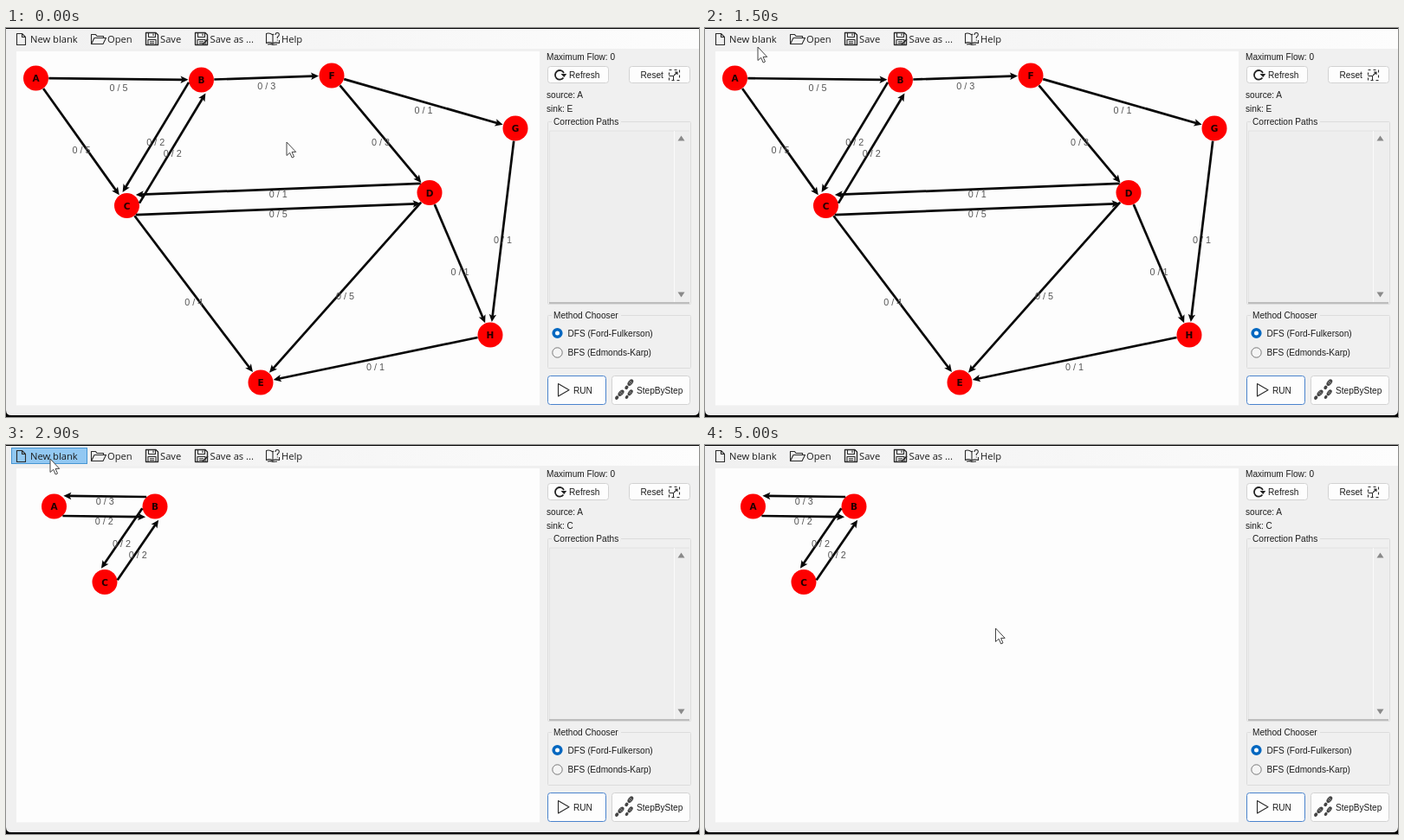
These frames come from a looping animation (800x450 px, 5150 ms). An HTML page:

```html
<!DOCTYPE html>
<html lang="en">
<head>
<meta charset="utf-8">
<title>Maximum flow editor</title>
<style>
  html, body { margin: 0; width: 100%; height: 100%; overflow: hidden; background: #000; }
  svg { display: block; width: 100vw; height: 100vh; }
  text { font: 10.1px "Liberation Sans", Arial, sans-serif; fill: #1c1c1c; }
  .menu text { font: 11.2px "Open Sans", "Noto Sans", sans-serif; }
  .node { font: bold 10.5px "DejaVu Sans", sans-serif; fill: #240000; text-anchor: middle; }
  .flow { font-size: 10.8px; fill: #555; text-anchor: middle; }
  .icon { fill: none; stroke: #2b2b2b; stroke-width: 1.1; stroke-linejoin: round; }
  .button { fill: #fdfdfd; stroke: #d2d2d2; }
  .group { fill: none; stroke: #dcdcdc; }
</style>
</head>
<body>
<svg viewBox="0 0 800 450">
  <defs>
    <linearGradient id="bar"><stop stop-color="#f0f0f0"/><stop offset="1" stop-color="#fdfdfd"/></linearGradient>
    <g id="floppy">
      <path d="M.5.5H12L14.5 3V14.5H.5Z" stroke-width="1.4"/>
      <path d="M3.5.5V5.5H11.5V.5M9 1.5V4M3 14.5V8.5H12V14.5M5 10.7H10M5 12.7H10"/>
    </g>
    <g id="foot" fill="#444">
      <ellipse cy="-3" rx="2.6" ry="4.3"/>
      <ellipse cy="4.2" rx="1.9" ry="2.4"/>
      <path d="M-2-4H2M-2-2H2" stroke="#aaa" stroke-width=".7"/>
    </g>
  </defs>

  <path d="M0 1H800V442Q800 448 794 448H6Q0 448 0 442Z" fill="#f0f0f0"/>
  <rect y="1" width="800" height="23" fill="url(#bar)"/>
  <rect x="12" y="27" width="604" height="409.5" fill="#fdfdfd"/>

  <rect id="hover" x="6.5" y="3.5" width="87" height="18" fill="#92c8f2" stroke="#4595d2"/>
  <g class="menu">
    <g class="icon">
      <path d="M12.5 6.5H18.5L22.5 10.5V19.5H12.5ZM18.5 6.5V10.5H22.5"/>
      <path d="M98.5 18.5V7.5H103.5L105 9.5H112.5V11.5M98.5 18.5L102 11.5H115.5L112 18.5Z"/>
      <use href="#floppy" x="161" y="5"/>
      <use href="#floppy" x="218" y="5"/>
      <path d="M227 19L233 13" stroke-width="1.6"/>
      <path d="M308 18Q304 15.5 300.5 17.5V6.5Q304 5 308 8V18Q311 16 315.5 17.5V14M308 8L309 7M302 19Q306 18 308 19.5L313 19"/>
      <path d="M311 8Q311 5.5 313.2 5.5T315.3 8Q315.2 9.2 313.3 10.5V12M313.3 13.5V14.5"/>
    </g>
    <text x="28" y="17">New blank</text>
    <text x="117" y="17">Open</text>
    <text x="178" y="17">Save</text>
    <text x="235.5" y="17">Save as ...</text>
    <text x="318" y="17">Help</text>
  </g>

  <text x="624" y="37">Maximum Flow: 0</text>
  <rect class="button" x="625.5" y="44.5" width="70" height="19" rx="3"/>
  <path d="M643.5 57.5A5.3 5.3 0 1 1 644 52" fill="none" stroke="#222" stroke-width="1.8"/>
  <path d="M640.5 53H647.2L644.3 57Z" fill="#222"/>
  <text x="650" y="58">Refresh</text>
  <rect class="button" x="719.5" y="44.5" width="70" height="19" rx="3"/>
  <text x="732.5" y="58">Reset</text>
  <path class="icon" d="M765.5 48.5H777.5V60.5H765.5Z" stroke-dasharray="3 3"/>
  <path class="icon" d="M765.5 55.5H770.5V60.5M771 55L775 51M772 51H775V54"/>
  <text x="624" y="81">source: A</text>
  <text x="624" y="97" id="sink"></text>

  <rect class="group" x="625.5" y="108.5" width="165" height="211" rx="1"/>
  <rect x="630" y="103" width="80" height="12" fill="#f0f0f0"/>
  <text x="632" y="112">Correction Paths</text>
  <rect x="627.5" y="119" width="161.5" height="199" fill="#eee"/>
  <path d="M627.5 318V119H789" fill="none" stroke="#e2e2e2"/>
  <path d="M771.5 119V317" stroke="#fafafa"/>
  <path d="M627 318H789" stroke="#8c8c8c"/>
  <path d="M775.5 130.5L779.5 124.5 783.5 130.5ZM775.5 305.5L779.5 311.5 783.5 305.5Z" fill="#8a8a8a"/>

  <rect class="group" x="625.5" y="332.5" width="165" height="61" rx="1"/>
  <rect x="630" y="327" width="80" height="12" fill="#f0f0f0"/>
  <text x="632" y="336">Method Chooser</text>
  <circle cx="636.5" cy="353" r="4.3" fill="#fff" stroke="#0067c0" stroke-width="3.6"/>
  <circle cx="636.5" cy="375.5" r="5.7" fill="#f5f5f5" stroke="#777"/>
  <text x="648.5" y="357">DFS (Ford-Fulkerson)</text>
  <text x="648.5" y="379">BFS (Edmonds-Karp)</text>

  <rect class="button" x="625.5" y="402.5" width="67" height="33" rx="3" style="stroke:#4a83cd"/>
  <path class="icon" d="M637.5 411.5L650 418.7 637.5 426Z" stroke-width="1.3"/>
  <text x="655" y="423">RUN</text>
  <rect class="button" x="699.5" y="402.5" width="90" height="33" rx="3"/>
  <use href="#foot" transform="translate(719 412.5) rotate(38)"/>
  <use href="#foot" transform="translate(708 424.5) rotate(42)"/>
  <use href="#foot" transform="translate(719 424) rotate(38) scale(.9)"/>
  <text x="728" y="423">StepByStep</text>

  <g id="network"></g>
  <g id="blank"></g>
  <path id="cursor" d="M0 0V15.5L3.7 12.3 6.2 18 8.5 17 6.1 11.4H10.7Z" fill="#fff" stroke="#444"/>
</svg>
<script>
const $ = id => document.getElementById(id);

function add(parent, tag, attrs, text = '') {
  const el = document.createElementNS('http://www.w3.org/2000/svg', tag);
  for (const key in attrs) el.setAttribute(key, attrs[key]);
  el.textContent = text;
  parent.append(el);
}

const polar = ([x, y], radius, angle) => [x + radius * Math.cos(angle), y + radius * Math.sin(angle)];

// Each edge reads "from, to, capacity"; opposite edges keep to their right.
function drawGraph(group, nodes, edgeList) {
  for (const name in nodes) {
    const [x, y] = nodes[name];
    add(group, 'circle', { cx: x, cy: y, r: 14.5, fill: '#fe0000' });
    add(group, 'text', { x, y: y + 4, class: 'node' }, name);
  }
  const edges = edgeList.split(' ').map(([from, to, capacity]) => {
    const a = nodes[from], b = nodes[to];
    const heading = Math.atan2(b[1] - a[1], b[0] - a[0]);
    const twoWay = edgeList.includes(to + from);
    const turn = twoWay ? 0.84 : 0;
    const start = polar(a, 14.8, heading + turn);
    const tip = polar(b, twoWay ? 16.3 : 15, heading + Math.PI - turn);
    return { start, tip, capacity, drop: twoWay ? 6 : 10 };
  });
  for (const { start, tip } of edges) {
    const angle = Math.atan2(tip[1] - start[1], tip[0] - start[0]);
    add(group, 'path', {
      d: `M${start}L${polar(tip, -6, angle)}`, stroke: '#080808', 'stroke-width': 2.7
    });
    add(group, 'path', {
      d: 'M0 0L-9-4.2-7 0-9 4.2Z', fill: '#080808',
      transform: `translate(${tip}) rotate(${angle * 180 / Math.PI})`
    });
  }
  for (const { start, tip, capacity, drop } of edges) {
    const x = (start[0] + tip[0]) / 2, y = (start[1] + tip[1]) / 2 + drop + 3.8;
    add(group, 'text', { x, y, class: 'flow' }, `0 / ${capacity}`);
  }
}

drawGraph($('network'), {
  A: [34.5, 58], B: [225.5, 60], C: [139.5, 205.5], D: [489, 190.5],
  E: [294, 410], F: [376, 55], G: [588, 116], H: [559, 355]
}, 'AB5 AC5 BC2 CB2 BF3 FG1 FD3 DC1 CD5 CE4 DE5 DH1 GH1 HE1');
drawGraph($('blank'), { A: [55.5, 71], B: [172, 71], C: [114, 158.5] }, 'BA3 AB2 BC2 CB2');

const LOOP = 5150, TICK = 50;
const linear = k => k;
const speedUp = k => k * k;
const slowDown = k => 1 - (1 - k) ** 3;
const home = [324, 132];
const glides = [
  { from: 750, until: 1050, to: [237, 106], ease: speedUp },
  { from: 1050, until: 1500, to: [61, 22], ease: slowDown },
  { from: 1500, until: 1700, to: [51, 16], ease: slowDown },
  { from: 3350, until: 3500, to: [64, 28], ease: linear },
  { from: 3500, until: 3900, to: [108, 62], ease: speedUp },
  { from: 3900, until: 4000, to: [294, 189], ease: linear },
  { from: 4000, until: 4350, to: [335.5, 212], ease: slowDown }
];

function cursorAt(t) {
  return glides.reduce((pos, { from, until, to, ease }) => {
    const k = ease(Math.min(1, Math.max(0, (t - from) / (until - from))));
    return pos.map((p, i) => p + (to[i] - p) * k);
  }, home);
}

const show = (id, on) => $(id).style.display = on ? '' : 'none';

function draw(now) {
  const t = Math.floor(Math.max(0, now - start) % LOOP / TICK) * TICK;
  const cleared = t >= 2700;
  show('network', !cleared);
  show('blank', cleared);
  show('hover', t >= 1600 && t < 3450);
  $('sink').textContent = cleared ? 'sink: C' : 'sink: E';
  $('cursor').setAttribute('transform', `translate(${cursorAt(t)})`);
  requestAnimationFrame(draw);
}

const start = performance.now();
draw(start);
</script>
</body>
</html>
```
